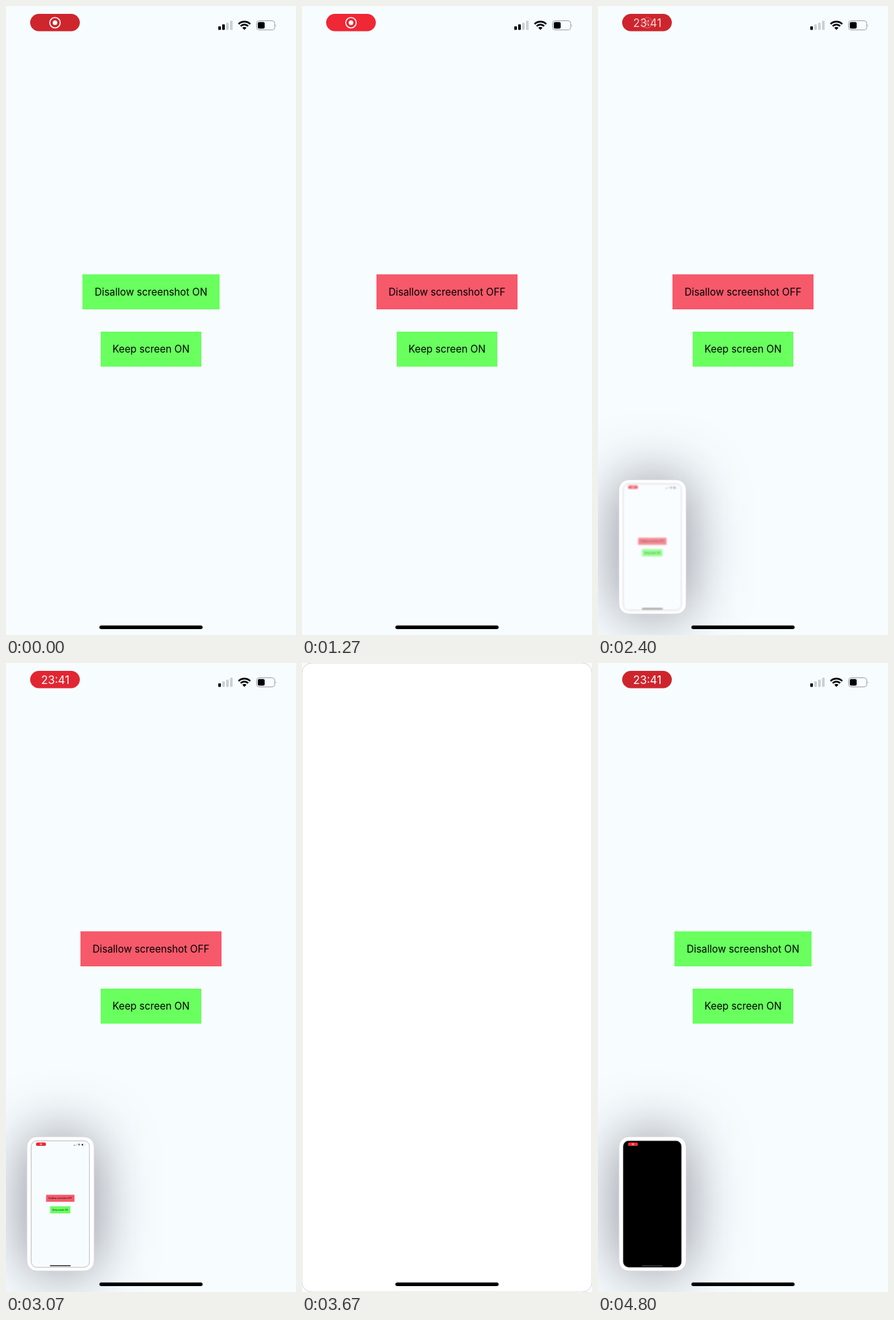
An HTML page that plays this animation: 444x960 px, repeating every 4870 ms.

```html
<!DOCTYPE html>
<html lang="en">
<head>
<meta charset="utf-8">
<title>Screenshot toggle</title>
<style>
  html, body { margin: 0; width: 100%; height: 100%; overflow: hidden; background: #f7fdff; }
  svg { display: block; width: 100vw; height: 100vh; }
  text { font: 15.3px Inter, "Liberation Sans", sans-serif; text-anchor: middle; }
  #shadow { filter: blur(46px); }
</style>
</head>
<body>
<svg viewBox="0 0 444 960">
  <defs>
    <g id="rec" fill="#fff">
      <circle cx="75" cy="25.5" r="8" fill="none" stroke="#fff" stroke-width="1.6"/>
      <circle cx="75" cy="25.5" r="3.5"/>
    </g>
    <rect id="pill" x="37" y="12" width="76" height="26.5" rx="13.25"/>
    <g id="status">
      <rect x="325" y="31" width="4" height="5.5" rx="1"/>
      <rect id="bar" x="331" y="28" width="4" height="8.5" rx="1"/>
      <rect x="337" y="25.5" width="4" height="11" rx="1" fill="#ccd0d1"/>
      <rect x="343" y="22.5" width="4" height="14" rx="1" fill="#ccd0d1"/>
      <path d="M356.1 27.6a12.6 12.6 0 0 1 17.8 0M359.3 30.8a8 8 0 0 1 11.4 0" fill="none" stroke="#000" stroke-width="2.7"/>
      <path d="M365 36.5l-3.2-3.2a4.5 4.5 0 0 1 6.4 0z"/>
      <rect x="383.5" y="22.5" width="28" height="14" rx="4" fill="none" stroke="#999d9e"/>
      <rect x="385.5" y="24.5" width="10.5" height="10" rx="2"/>
      <path d="M412.8 27.5q1.4 2 0 4z" fill="#999d9e"/>
    </g>
    <g id="on">
      <rect x="117" y="409.5" width="210" height="53.5" fill="#68ff5f"/>
      <text x="222" y="441.7">Disallow screenshot ON</text>
    </g>
    <g id="off">
      <rect x="114" y="409.5" width="216" height="53.5" fill="#f5596a"/>
      <text x="222" y="441.7">Disallow screenshot OFF</text>
    </g>
    <g id="keep">
      <rect x="145" y="497" width="154" height="53.5" fill="#68ff5f"/>
      <text x="222" y="529.2">Keep screen ON</text>
    </g>
    <rect id="home" x="143" y="945.5" width="158" height="5.5" rx="2.75"/>
  </defs>

  <rect width="444" height="960" fill="#f7fdff"/>
  <use id="livePill" href="#pill"/>
  <use id="dot" href="#rec"/>
  <text id="clock" x="75.5" y="31.7" fill="#fff" style="font-size:17px">23:41</text>
  <use href="#status"/>
  <use id="liveOn" href="#on"/>
  <use id="liveOff" href="#off"/>
  <use href="#keep"/>

  <g id="shot">
    <rect id="shadow" x="32" y="723" width="103" height="205" rx="15" fill="#191428" fill-opacity=".5"/>
    <rect id="card" rx="15" fill="#fff" stroke="#d3d4da"/>
    <g id="image" transform="translate(38.5 729.3) scale(.201)">
      <g id="open">
        <rect width="444" height="960" rx="42" fill="#f7fdff" stroke="#aaa" stroke-width="4"/>
        <use href="#status"/>
        <use href="#off"/>
        <use href="#keep"/>
        <use href="#home"/>
      </g>
      <g id="blocked">
        <rect width="444" height="960" rx="42" stroke="#777" stroke-width="3"/>
        <use href="#home" fill="#444"/>
      </g>
      <use href="#pill" fill="#ee2838"/>
      <use href="#rec"/>
    </g>
  </g>
  <use href="#home"/>
</svg>
<script>
const LOOP = 4870, OFF_AT = 1100, ON_AT = 3130;
const SHOTS = [
  { at: 1600, end: 3470, blocked: false },
  { at: 3686, end: LOOP, blocked: true }
];
const $ = id => document.getElementById(id);
const clamp = v => Math.max(0, Math.min(1, v));
const ramp = (t, a, b) => clamp((t - a) / (b - a));
const mix = (a, b, p) => a + (b - a) * p;
const show = (id, on) => $(id).setAttribute("display", on ? "inline" : "none");
const set = (el, attrs) => { for (const k in attrs) el.setAttribute(k, attrs[k]); };

// The screen stalls briefly before each capture.
const stall = t => t > 1330 && t < 1600 ? 1330 : t > 3470 && t < 3670 ? 3470 : t;

function drawShot(t) {
  const shot = SHOTS.find(s => t >= s.at - 20 && t < s.end);
  show("shot", shot);
  if (!shot) return;
  const age = Math.max(0, t - shot.at) / 1000;
  const k = 21.6 * age;
  const p = 1 - (1 + k) * Math.exp(-k);
  const x = mix(0, 32, p), y = mix(0, 723, p);
  set($("card"), { x, y, width: mix(444, 135, p) - x, height: mix(960, 928, p) - y });
  $("shadow").style.opacity = ramp(age, 0, .12);

  const seen = ramp(age, .45, .95);
  $("image").style.opacity = seen;
  $("image").style.filter = seen < 1 ? `blur(${(1 - seen) * 18}px)` : "none";
  show("open", !shot.blocked);
  show("blocked", shot.blocked);
}

function draw(t) {
  const glow = .5 + .5 * Math.cos((stall(t) - 1100) / 2550 * 2 * Math.PI);
  $("livePill").setAttribute("fill",
    `rgb(${mix(205, 242, glow)},${mix(37, 39, glow)},${mix(45, 52, glow)})`);
  const swap = ramp(t, 2180, 2460);
  $("dot").style.opacity = 1 - swap;
  $("clock").style.opacity = swap;
  $("bar").setAttribute("fill", t < 1600 ? "#000" : "#ccd0d1");
  const off = t >= OFF_AT && t < ON_AT;
  show("liveOff", off);
  show("liveOn", !off);
  drawShot(t);
}

const start = performance.now();
function tick() {
  draw((performance.now() - start) % LOOP);
  requestAnimationFrame(tick);
}
tick();
</script>
</body>
</html>
```
